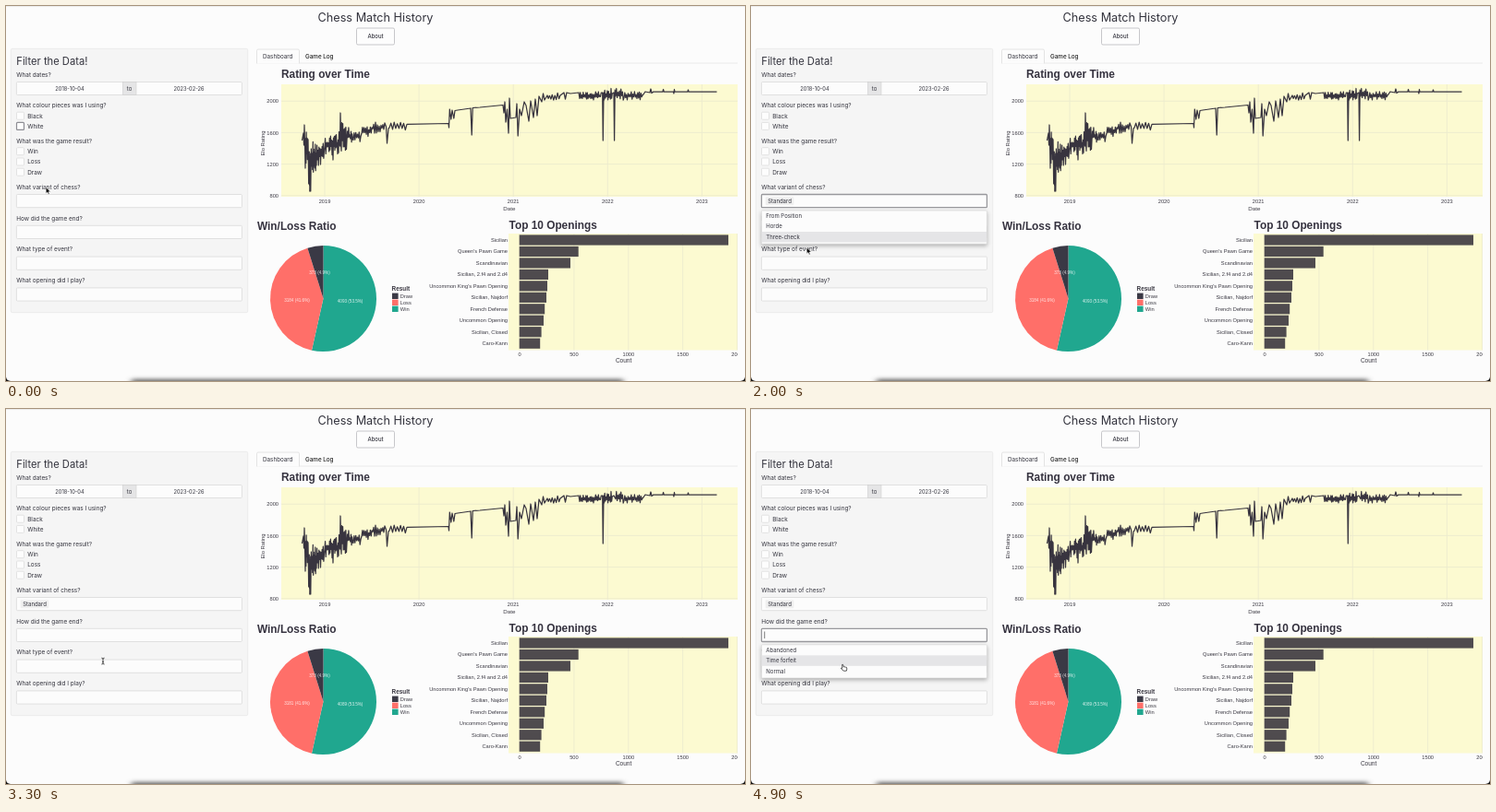
Write an HTML page that moves like this. It is 800 by 407 pixels and loops after 5000 ms.

```html
<!DOCTYPE html>
<html lang="en">
<head>
<meta charset="utf-8">
<title>Chess Match History</title>
<style>
html, body { margin: 0; width: 100%; height: 100%; overflow: hidden; background: #fcfcfc; }
svg { display: block; width: 100vw; height: 100vh; }
text { font-family: Inter, sans-serif; font-size: 6.4px; fill: #33333d; white-space: pre; }
.chart text { font-family: "Liberation Sans", Arial, sans-serif; font-size: 5.7px; fill: #3a3842; }
.chart .head { font-size: 11.85px; font-weight: 700; fill: #35323f; }
.chart .axis { font-size: 6.2px; }
.chart .slice { font-size: 4.6px; fill: #fff; fill-opacity: .85; }
.list { filter: drop-shadow(0 2px 2px rgba(0, 0, 0, .28)); }
</style>
</head>
<body>
<svg id="stage" viewBox="0 0 800 407" xmlns="http://www.w3.org/2000/svg">
  <defs>
    <filter id="soft" x="-10%" y="-200%" width="120%" height="500%"><feGaussianBlur stdDeviation="3 2"/></filter>
    <clipPath id="bounds"><rect width="792" height="407"/></clipPath>
  </defs>
</svg>
<script>
const stage = document.getElementById('stage');
const INK = '#38343f', DARK = '#3a3945', RED = '#ff6f69', GREEN = '#20a78f';
const YELLOW = '#fcfad1', GRID = '#edebcf', LOOP = 5000;

function el(parent, tag, attrs = {}, content) {
  const node = document.createElementNS('http://www.w3.org/2000/svg', tag);
  for (const key in attrs) node.setAttribute(key, attrs[key]);
  if (content !== undefined) node.textContent = content;
  parent.appendChild(node);
  return node;
}
const group = (parent, attrs) => el(parent, 'g', attrs);
const rect = (parent, x, y, width, height, fill, more) =>
  el(parent, 'rect', { x, y, width, height, fill, ...more });
const text = (parent, x, y, content, more) => el(parent, 'text', { x, y, ...more }, content);
const line = (parent, x1, y1, x2, y2, stroke, width = 0.6) =>
  el(parent, 'line', { x1, y1, x2, y2, stroke, 'stroke-width': width });
const show = (node, on) => node.setAttribute('display', on ? 'inline' : 'none');
const mid = { 'text-anchor': 'middle' }, right = { 'text-anchor': 'end' };

// Page frame
rect(stage, 0, 0, 800, 407, '#fcfcfc');
line(stage, 0, 0.2, 800, 0.2, '#d5d5d5', 0.6);
text(stage, 400, 16.8, 'Chess Match History', { ...mid, style: 'font-size:12.7px' });
rect(stage, 379.5, 24, 41, 18, '#fdfdfd', { rx: 1.5, stroke: '#b9b9bd', 'stroke-width': 0.8 });
text(stage, 400, 35.2, 'About', { ...mid, style: 'font-size:6px;font-weight:500' });
line(stage, 271.5, 62, 792, 62, '#dedede');
el(stage, 'path', { d: 'M271.5 62.4V48.5q0-1.5 1.5-1.5h43q1.5 0 1.5 1.5V62.4', fill: '#fcfcfc', stroke: '#dadada', 'stroke-width': 0.7 });
text(stage, 278, 57, 'Dashboard', { style: 'font-size:6.3px' });
text(stage, 324, 57, 'Game Log', { style: 'font-size:6.3px;font-weight:500;fill:#222' });

// Filter panel
rect(stage, 5.3, 46.3, 256.4, 286.4, '#f5f5f5', { rx: 1.5, stroke: '#e6e6e6', 'stroke-width': 0.7 });
text(stage, 11.3, 63.6, 'Filter the Data!', { style: 'font-size:11.2px' });
[['What dates?', 76.7], ['What colour pieces was I using?', 109.8], ['What was the game result?', 148.8],
 ['What variant of chess?', 198.7], ['How did the game end?', 232.6], ['What type of event?', 266.4],
 ['What opening did I play?', 300.1]].forEach(([label, y]) => text(stage, 11.3, y, label));

rect(stage, 11.4, 82.5, 244, 14, '#fcfcfc', { rx: 1, stroke: '#d6d6d6', 'stroke-width': 0.7 });
rect(stage, 126.4, 82.5, 14.6, 14, '#e5e5e6', { stroke: '#cfcfcf', 'stroke-width': 0.6 });
const dateStyle = { ...mid, style: 'font-size:5.7px' };
text(stage, 69, 91.7, '2018-10-04', dateStyle);
text(stage, 133.5, 91.7, 'to', { ...mid, style: 'font-size:6px' });
text(stage, 198, 91.7, '2023-02-26', dateStyle);

const boxes = {};
[['Black', 119.3], ['White', 130.5], ['Win', 157.8], ['Loss', 169.1], ['Draw', 180.3]].forEach(([label, y]) => {
  boxes[label] = rect(stage, 11.5, y - 4.1, 8, 8, '#fdfdfd', { rx: 1, stroke: '#d8d8d8', 'stroke-width': 0.7 });
  text(stage, 23.2, y + 2.3, label);
});
const fields = [204.5, 238.3, 272.1, 305.9].map(y =>
  rect(stage, 11.4, y, 244, 14.2, '#fcfcfc', { rx: 1 }));
function focus(node, stroke, width) {
  node.setAttribute('stroke', stroke);
  node.setAttribute('stroke-width', width);
}

const tag = group(stage);
rect(tag, 15.7, 207.2, 30.6, 9, '#efefef', { rx: 1 });
text(tag, 18.2, 213.8, 'Standard', { style: 'font-size:6px' });
const caret = line(stage, 14.7, 0, 14.7, 7.6, '#444', 0.7);

// Charts
const charts = group(stage, { class: 'chart', 'clip-path': 'url(#bounds)' });
text(charts, 298, 78.3, 'Rating over Time', { class: 'head' });
rect(charts, 298, 85, 494, 122, YELLOW);
[2000, 1600, 1200, 800].forEach((elo, i) => {
  const y = 103.2 + i * 34.2;
  line(charts, 298, y, 792, y, GRID, 0.9);
  text(charts, 295, y + 2.2, elo, right);
});
for (let i = 0; i < 5; i++) {
  const x = 345 + i * 102.1;
  line(charts, x, 85, x, 207, GRID, 0.9);
  text(charts, x, 214.4, 2019 + i, mid);
}
text(charts, 544.8, 221.6, 'Date', { ...mid, class: 'axis' });
text(charts, 0, 0, 'Elo Rating', { ...mid, class: 'axis', style: 'font-size:5.9px', transform: 'translate(279.6 149) rotate(-90)' });

// Jagged stretches: zone(from x, to x, top, bottom, steps)
function ratingPath(lateDip) {
  let seed = 11;
  const random = () => (seed = seed * 16807 % 2147483647) / 2147483647;
  const pts = [];
  const at = (...xy) => { for (let i = 0; i < xy.length; i += 2) pts.push([xy[i], xy[i + 1]]); };
  const zone = (x0, x1, top, bottom, steps) => {
    for (let i = 0; i < steps; i++) {
      const depth = 0.45 * random();
      pts.push([x0 + (x1 - x0) * i / steps, top + (bottom - top) * (i % 2 ? depth : 1 - depth)]);
    }
  };
  at(320.5, 146, 322, 138, 322.5, 151, 323, 129, 323.7, 157);
  zone(324, 327, 136, 176, 8);
  at(327, 145, 327.7, 193);
  zone(328, 330, 152, 200, 6);
  at(328.8, 201, 329.3, 170, 329.8, 201, 330.4, 155);
  zone(331, 336, 146, 184, 12);
  zone(336, 345, 149, 173, 16);
  zone(345, 352, 141, 162, 12);
  zone(352, 361, 133, 167, 18);
  at(361.5, 152, 362, 116, 362.7, 153);
  zone(363, 369, 126, 158, 11);
  zone(369, 376, 131, 151, 11);
  zone(376, 385, 136, 148, 10);
  zone(385, 397, 130, 142, 14);
  zone(397, 411, 126, 138, 14);
  at(411.5, 131, 412.5, 149, 414, 133);
  zone(415, 434, 125, 135, 11);
  at(434, 128.3, 479, 127.5, 479.5, 132, 480.3, 112, 481.8, 123, 483, 113, 484.8, 122, 486, 113.5,
    489, 113, 503, 111, 504.2, 140, 505.2, 110.5, 513, 110, 538, 107.5, 539, 116, 540, 104,
    541, 126, 542.5, 112, 544, 138, 545, 100, 546, 122, 552, 121, 553, 106, 554.2, 141, 556, 112,
    558, 119, 561, 104, 563, 108, 566, 125, 568, 103, 571, 121, 573, 101, 575, 119, 577, 98,
    580, 104, 581.5, 95, 583, 102, 586, 97);
  zone(587, 600, 94, 103, 9);
  at(600, 97, 604, 94, 605.5, 101, 607, 94, 611, 95, 620, 94);
  zone(621, 645, 93, 102, 32);
  at(645.7, 94, 646.3, 146, 647, 94);
  zone(647.5, 657, 89, 103, 14);
  at(658, 94);
  if (lateDip) at(658.6, 146, 659.2, 91);
  zone(660, 669, 89, 103, 11);
  zone(669, 690, 92.5, 102, 24);
  at(690, 96, 692, 93, 697, 94, 698, 90, 699, 94.5, 701, 93, 711, 93, 711.6, 90.5, 712.2, 93,
    722.5, 93, 723, 95, 723.5, 90.5, 724, 93, 738, 93, 738.5, 91, 739, 93, 769.5, 93);
  return 'M' + pts.map(p => p[0].toFixed(1) + ' ' + p[1].toFixed(1)).join('L');
}
const paths = [ratingPath(true), ratingPath(false)];
const rating = el(charts, 'path', { fill: 'none', stroke: INK, 'stroke-width': 1.25, 'stroke-linejoin': 'round' });

// Pie
text(charts, 272, 243, 'Win/Loss Ratio', { class: 'head' });
function slice(from, to, fill) {
  const cx = 343.5, cy = 317.6, r = 57.5;
  const point = share => {
    const a = share * 2 * Math.PI;
    return `${cx + r * Math.sin(a)} ${cy - r * Math.cos(a)}`;
  };
  const large = to - from > 0.5 ? 1 : 0;
  el(charts, 'path', { d: `M${cx} ${cy}L${point(from)}A${r} ${r} 0 ${large} 1 ${point(to)}Z`, fill });
}
slice(0, 0.535, GREEN);
slice(0.535, 0.952, RED);
slice(0.952, 1, DARK);
const sliceText = { ...mid, class: 'slice' };
text(charts, 339.5, 290.8, '373 (4.9%)', sliceText);
const lossLabel = text(charts, 315, 320.8, '', sliceText);
const winLabel = text(charts, 372.6, 322.4, '', sliceText);
text(charts, 417.6, 308.8, 'Result', { style: 'font-size:6.4px;font-weight:700' });
[['Draw', DARK], ['Loss', RED], ['Win', GREEN]].forEach(([label, fill], i) => {
  rect(charts, 418, 311.6 + i * 7, 6.6, 6.4, fill);
  text(charts, 426.8, 316.9 + i * 7, label);
});

// Bars
text(charts, 544.6, 241.6, 'Top 10 Openings', { class: 'head' });
rect(charts, 544, 247, 248, 126.5, YELLOW);
for (let i = 0; i < 5; i++) {
  const x = 556 + i * 58.9;
  line(charts, x, 247, x, 373.5, GRID, 0.9);
  text(charts, x, 380.2, i * 500, mid);
}
[['Sicilian', 782], ["Queen's Pawn Game", 619.7], ['Scandinavian', 611], ['Sicilian, 2.f4 and 2.d4', 587],
 ["Uncommon King's Pawn Opening", 586], ['Sicilian, Najdorf', 585], ['French Defense', 583.2],
 ['Uncommon Opening', 582], ['Sicilian, Closed', 579.6], ['Caro-Kann', 578.2]].forEach(([label, end], i) => {
  const y = 254 + i * 12.47;
  rect(charts, 555.7, y - 5.6, end - 555.7, 11.2, '#4f4b4e');
  text(charts, 543, y + 2, label, right);
});
text(charts, 668.6, 387, 'Count', { ...mid, class: 'axis', style: 'font-size:6.5px' });

// Bottom edge of the window
rect(stage, 136, 405, 532, 8, '#666', { filter: 'url(#soft)' });
el(stage, 'path', { d: 'M0 402.5Q.4 406.6 5 407H0ZM800 402.5Q799.6 406.6 795 407H800Z', fill: '#111' });

// Drop-down lists
const ROW = 11.4;
function makeList(top, options) {
  const g = group(stage, { class: 'list' });
  const height = options.length * ROW + 2;
  rect(g, 11.4, top, 244, height, '#fcfcfc', { rx: 1, stroke: '#d4d4d4', 'stroke-width': 0.6 });
  const mark = rect(g, 11.7, top, 243.4, ROW, '#e5e5e7');
  options.forEach((label, i) => text(g, 16.3, top + 7.9 + i * ROW, label, { style: 'font-size:6px' }));
  return { g, mark, top, height, count: options.length };
}
const variants = ['Standard', 'From Position', 'Horde', 'Three-check'];
const lists = [
  { ...makeList(222, variants), from: 400, to: 1300 },
  { ...makeList(222, variants.slice(1)), from: 1300, to: 2300 },
  { ...makeList(255.8, ['Abandoned', 'Time forfeit', 'Normal']), from: 3700, to: LOOP }
];

// Pointers, each with its hot spot at 0,0
const pointer = group(stage);
const outline = { stroke: '#fff', 'stroke-width': 0.6, 'stroke-linejoin': 'round' };
const kinds = {
  arrow: el(pointer, 'path', { d: 'M0 0V6.9L1.6 5.5L2.7 8L3.9 7.5L2.8 5.1H5Z', fill: '#000', ...outline }),
  beam: el(pointer, 'path', { d: 'M-1.6-3.4Q0-3.4 0-2.4Q0-3.4 1.6-3.4M0-2.6V2.6M-1.6 3.4Q0 3.4 0 2.4Q0 3.4 1.6 3.4M-.8 .9H.8', fill: 'none', stroke: '#222', 'stroke-width': 0.8 }),
  hand: el(pointer, 'path', { d: 'M0 0Q.8-.4 1.1.5L1.6 2.4Q2.4 1.8 2.8 2.6Q3.6 2.1 3.9 2.9Q4.8 2.6 5 3.6Q5.3 5.2 4.6 6.8H1.5L-1.2 4.3Q-1.3 3.3-.2 3.7L.2 4Z', fill: '#fff', stroke: '#111', 'stroke-width': 0.7, 'stroke-linejoin': 'round' })
};

// time, x, y
const route = [
  [0, 43.2, 196.6], [400, 50, 212], [500, 50, 212], [900, 54.2, 232.4], [1200, 50, 229], [1400, 50, 229],
  [2000, 60.3, 262], [2100, 60.3, 262], [2400, 121, 164.6], [2700, 121, 165], [3300, 105, 273.6],
  [3600, 104.3, 245.3], [3900, 104.3, 245.3], [4400, 101, 268], [4900, 98.7, 277.4], [LOOP, 98.7, 277.4]
];
function position(t) {
  const i = route.findIndex((key, n) => n && t <= key[0]);
  const [a, b] = [route[i - 1], route[i]];
  const u = (t - a[0]) / (b[0] - a[0]);
  const ease = u * u * (3 - 2 * u);
  return [a[1] + (b[1] - a[1]) * ease, a[2] + (b[2] - a[2]) * ease];
}

function draw(ms) {
  const t = Math.floor(ms / 100) * 100 % LOOP;
  const [x, y] = position(t);
  let kind = 'arrow';
  if (fields.some(f => Math.abs(y - f.getAttribute('y') - 7.1) < 7.1)) kind = 'beam';

  lists.forEach(list => {
    const open = t >= list.from && t < list.to;
    show(list.g, open);
    if (!open) return;
    const row = Math.max(0, Math.min(list.count - 1, Math.floor((y - list.top) / ROW)));
    list.mark.setAttribute('y', list.top + 0.2 + row * ROW);
    if (y >= list.top) kind = y < list.top + list.height ? 'hand' : 'arrow';
  });

  const first = t >= 400 && t < 2600, second = t >= 3700;
  focus(boxes.White, t < 400 ? '#8d8d94' : '#d8d8d8', t < 400 ? 1.2 : 0.7);
  fields.forEach((f, i) => {
    const on = i === 0 && first || i === 1 && second;
    const fading = i === 0 && t >= 2400;
    focus(f, on ? (fading ? '#b0b0b3' : '#98989c') : '#d6d6d6', on ? 1.3 : 0.7);
  });
  show(tag, t >= 1300);

  const typedFrom = second ? 3700 : t >= 1300 ? 1300 : 400;
  show(caret, (second || first && t < 2300) && (t - typedFrom) % 1000 < 500);
  caret.setAttribute('transform', `translate(${!second && t >= 1300 ? 34 : 0} ${second ? 241.5 : 207.7})`);

  const filtered = t >= 2400;
  rating.setAttribute('d', paths[filtered ? 1 : 0]);
  lossLabel.textContent = filtered ? '3181 (41.6%)' : '3184 (41.6%)';
  winLabel.textContent = filtered ? '4089 (53.5%)' : '4093 (53.5%)';

  pointer.setAttribute('transform', `translate(${x.toFixed(2)} ${y.toFixed(2)})`);
  for (const name in kinds) show(kinds[name], name === kind);
}

const start = performance.now();
function tick() {
  draw((performance.now() - start) % LOOP);
  requestAnimationFrame(tick);
}
tick();
</script>
</body>
</html>
```
